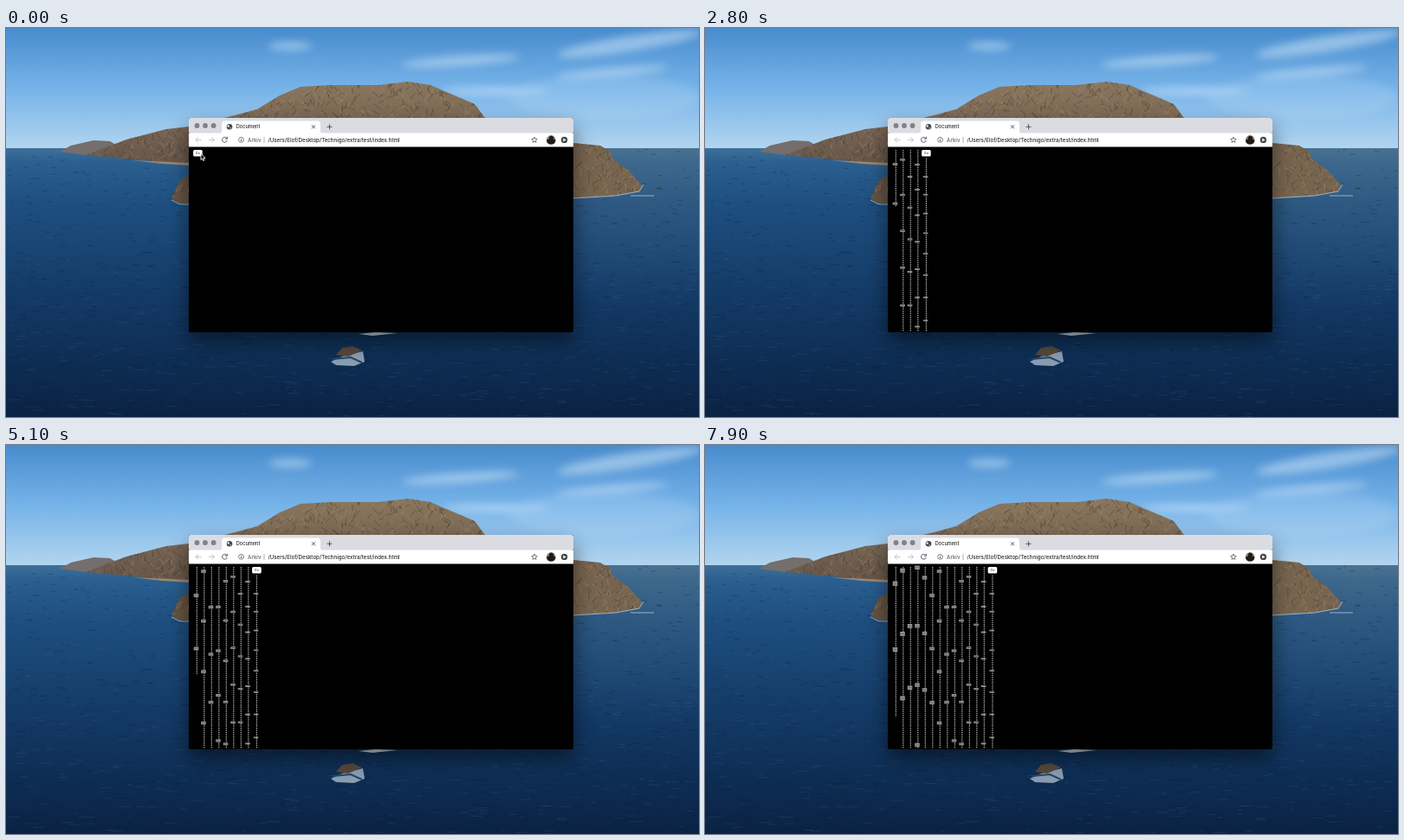
Write an HTML page with a canvas that moves like this. It is 800 by 450 pixels and loops after 8 s.

```html
<!DOCTYPE html>
<html lang="sv">
<head>
<meta charset="utf-8">
<title>Document</title>
<style>
  html, body { margin: 0; width: 100%; height: 100%; overflow: hidden; background: #0b2850; }
  svg, canvas { position: absolute; left: 0; top: 0; width: 800px; height: 450px; }
  text { font-family: Inter, "Open Sans", sans-serif; font-weight: 500; fill: #25272b; }
</style>
</head>
<body>
<svg viewBox="0 0 800 450">
  <defs>
    <linearGradient id="sky" x2="0" y2="1">
      <stop offset="0" stop-color="#488ccd"/>
      <stop offset=".5" stop-color="#76b3e9"/>
      <stop offset="1" stop-color="#b2d5ef"/>
    </linearGradient>
    <linearGradient id="sea" x2="0" y2="1">
      <stop offset="0" stop-color="#3f709a"/>
      <stop offset=".05" stop-color="#2b6090"/>
      <stop offset=".2" stop-color="#1e4f80"/>
      <stop offset=".55" stop-color="#133a66"/>
      <stop offset="1" stop-color="#0a2244"/>
    </linearGradient>
    <linearGradient id="land" x2="0" y2="1">
      <stop offset="0" stop-color="#8b775e"/>
      <stop offset="1" stop-color="#66564a"/>
    </linearGradient>
    <radialGradient id="glow" cx=".95" cy="0" r=".6">
      <stop offset="0" stop-color="#587488" stop-opacity=".5"/>
      <stop offset="1" stop-color="#3f607c" stop-opacity="0"/>
    </radialGradient>
    <filter id="soft" x="-30%" y="-80%" width="160%" height="260%"><feGaussianBlur stdDeviation="5"/></filter>
    <filter id="shade" x="-20%" y="-20%" width="140%" height="150%"><feGaussianBlur stdDeviation="12"/></filter>
    <clipPath id="ground"><use href="#hill"/><use href="#rock"/><use href="#cape"/></clipPath>
  </defs>

  <rect width="800" height="140" fill="url(#sky)"/>
  <g fill="#d5e9fa" filter="url(#soft)" opacity=".5">
    <ellipse cx="328" cy="21" rx="25" ry="5"/>
    <ellipse cx="525" cy="38" rx="68" ry="6" transform="rotate(-4 525 38)"/>
    <ellipse cx="720" cy="18" rx="85" ry="9" transform="rotate(-9 720 18)"/>
    <ellipse cx="565" cy="73" rx="62" ry="5"/>
    <ellipse cx="700" cy="51" rx="65" ry="5" transform="rotate(-5 700 51)"/>
    <ellipse cx="690" cy="80" rx="110" ry="26" opacity=".35"/>
  </g>
  <rect y="139" width="800" height="311" fill="url(#sea)"/>
  <rect y="139" width="800" height="311" fill="url(#glow)"/>
  <g id="waves" fill="none"/>

  <path d="M62 143L75 136 101 130 120 131 132 138 128 145 92 147z" fill="#746e6c"/>
  <path id="hill" d="M92 147L139 129 185 117 211 114 268 100 290 94 316 78 340 68 376 66 430 66 464 62 490 66 541 88 553 104V158H197L160 153z" fill="url(#land)"/>
  <path id="rock" d="M211 171L201 176 191 197 200 203 211 203z" fill="#665443"/>
  <path id="cape" d="M655 133L686 136 698 143 700 151 718 164 735 183 730 189 704 194 655 197z" fill="#786550"/>
  <g id="crags" fill="none" clip-path="url(#ground)"/>
  <path d="M145 153L211 156V159L180 157z" fill="#9c8872"/>
  <path d="M655 197L704 194 731 189 736 181M191 199L201 204H211M721 194H748" fill="none" stroke="#c8d8e2" opacity=".7"/>
  <path d="M749 186L754 184 758 187z" fill="#39424a"/>
  <path d="M375 386L388 380 412 374 414 386 402 391 381 390z" fill="#a9bac8" opacity=".8"/>
  <path d="M381 378L388 370 400 368 411 373 395 380z" fill="#57493a"/>
  <path d="M377 383L398 381 411 387" fill="none" stroke="#244667" stroke-width="2"/>
  <path d="M407 354L426 352 452 353 423 356z" fill="#c4d2dd"/>

  <rect x="211" y="116" width="444" height="246" fill="#000" opacity=".5" filter="url(#shade)"/>
  <rect x="211" y="104" width="444" height="248" rx="2" fill="#000"/>
  <rect x="211" y="104" width="444" height="18" rx="2" fill="#dadce2"/>
  <rect x="211" y="121.5" width="444" height="16" fill="#fff"/>
  <path d="M246 122Q249 122 249 119V111Q249 107.500 252.500 107.500H359.500Q363 107.500 363 111V119Q363 122 366 122z" fill="#fff"/>
  <g fill="#808289"><circle cx="220.500" cy="113" r="2.900"/><circle cx="230" cy="113" r="2.900"/><circle cx="239.600" cy="113" r="2.900"/></g>
  <circle cx="258" cy="114.300" r="3.300" fill="#45484d"/>
  <path d="M256 112L258 113 257 115 255.500 114zM258.500 115.500L260 115 259 117z" fill="#fff"/>
  <text x="265.800" y="116.300" font-size="5.600">Document</text>
  <g fill="none" stroke="#45484d" stroke-width=".9">
    <path d="M353 112.300l4 4m0 -4l-4 4M370.500 114.300h6m-3 -3v6"/>
    <path d="M225.500 129.300h-6.500m3 -3l-3 3 3 3M234 129.300h6.500m-3 -3l3 3 -3 3" stroke="#b9bbc0"/>
    <path d="M254.700 127.400A2.900 2.900 0 1 0 255.300 130M255.400 125.800v2.400h-2.400"/>
    <circle cx="271.500" cy="129.300" r="2.900" stroke-width=".7"/>
    <path d="M271.500 127.600v.7m0 .7v2"/>
    <path d="M298 126v7" stroke="#8c8f95" stroke-width=".7"/>
    <path d="M610 126l.9 2.300 2.400 .2 -1.800 1.500 .5 2.400 -2 -1.300 -2 1.300 .5 -2.400 -1.800 -1.500 2.400 -.2z" stroke-width=".7"/>
  </g>
  <text x="279" y="131.500" font-size="6.200" style="fill:#606368">Arkiv</text>
  <text x="302.500" y="131.500" font-size="6.150">/Users/Elof/Desktop/Technigo/extra/test/index.html</text>
  <circle cx="629.200" cy="129.400" r="5.300" fill="#8f8270"/>
  <path d="M624 130Q625 128.500 627 128.500A2.700 2.700 0 1 1 632 128.500Q634.500 129 634.500 130A5.300 5.300 0 0 1 624 130z" fill="#1f1b1a"/>
  <circle cx="644.500" cy="129.400" r="3.700" fill="#45484d"/>
  <path d="M643.300 127.400l3.300 2 -3.300 2z" fill="#fff"/>
</svg>
<canvas id="stage" width="800" height="450"></canvas>
<script>
const ctx = document.getElementById('stage').getContext('2d');
const LOOP = 8000, STEP = 100;
const TOP = 141, HEIGHT = 208, LEFT = 220.3, GAP = 8.5, PITCH = HEIGHT / 85;

// [time, columns filled]
const fill = [[600, 0], [1200, 1.14], [2800, 4.31], [4200, 6.97], [5900, 10.04], [7900, 13.83]];
// [time, x, y]
const path = [[700, 225, 145.5], [1200, 351.5, 168.5], [1900, 815, 250]];

let seed = 7;
function rand(min, max) {
  seed = (seed * 16807) % 2147483647;
  return min + (max - min) * seed / 2147483647;
}

// Adds one path of short random strokes; place() returns [x, y, dx, dy].
function scatter(id, count, color, opacity, place) {
  const d = Array.from({ length: count }, () => {
    const [x, y, dx, dy] = place().map(v => v.toFixed(1));
    return `M${x} ${y}l${dx} ${dy}`;
  }).join('');
  document.getElementById(id).insertAdjacentHTML('beforeend',
    `<path d="${d}" stroke="${color}" opacity="${opacity}"/>`);
}

function wave() {
  const depth = rand(0, 1);
  return [rand(0, 800), 141 + 309 * depth, rand(3, 6 + 10 * depth), rand(-1, 1)];
}
const crag = () => [rand(90, 740), rand(60, 197), rand(-7, 7), rand(2, 8)];

scatter('waves', 900, '#071e3e', .28, wave);
scatter('waves', 600, '#4c7499', .2, wave);
scatter('crags', 1500, '#42372c', .45, crag);
scatter('crags', 1100, '#ab9272', .4, crag);

function sample(keys, t) {
  const next = keys.findIndex(k => k[0] >= t);
  const i = next < 0 ? keys.length - 1 : Math.max(1, next);
  const a = keys[i - 1], b = keys[i];
  const p = Math.min(1, Math.max(0, (t - a[0]) / (b[0] - a[0])));
  return a.slice(1).map((v, j) => v + (b[j + 1] - v) * p);
}

// Distance of the nth wide row along the folded list; the gaps widen steadily.
const markAt = n => 31 + 20.3 * n + .496 * n * n;

const columnX = (col, last) => col ? LEFT + GAP * (last - col) : 221.4 + GAP * last;

function drawDots(x, from, to) {
  ctx.fillStyle = '#aaa';
  for (let y = from; y < to; y += PITCH) ctx.fillRect(x - .6, y, 1.2, 1.5);
}

function drawMark(x, y, col) {
  const h = 1.7 + col * .28;
  ctx.fillStyle = '#8e8e8e';
  ctx.fillRect(x - 3.6, y - h / 2, 5.6, h);
  if (h < 2.2) return;
  ctx.fillStyle = '#505050';
  ctx.fillRect(x - 2.6, y - .2, 3.6, .5);
}

function drawButton(x) {
  ctx.fillStyle = '#fff';
  ctx.beginPath();
  ctx.roundRect(x - 5.3, 141, 10.6, 7.5, 1.5);
  ctx.fill();
  ctx.fillStyle = '#444';
  ctx.font = '600 3.4px Inter, sans-serif';
  ctx.textAlign = 'center';
  ctx.fillText('Go', x, 146);
}

function drawCursor([x, y]) {
  ctx.save();
  ctx.translate(x, y);
  ctx.beginPath();
  for (const [px, py] of [[0, 0], [0, 7], [1.6, 5.6], [2.7, 8], [3.9, 7.4], [2.8, 5.1], [5, 5]]) ctx.lineTo(px, py);
  ctx.closePath();
  ctx.fillStyle = '#000';
  ctx.strokeStyle = '#fff';
  ctx.lineWidth = .9;
  ctx.fill();
  ctx.stroke();
  ctx.restore();
}

function draw(t) {
  const [filled] = sample(fill, t);
  const last = Math.floor(filled);
  ctx.clearRect(0, 0, 800, 450);
  for (let c = 0; c <= last; c++) {
    const from = c ? TOP : TOP + 4 * PITCH;
    drawDots(columnX(c, last), from, TOP + HEIGHT * Math.min(1, filled - c));
  }
  for (let n = 0; markAt(n) <= filled * HEIGHT; n++) {
    const col = Math.floor(markAt(n) / HEIGHT);
    drawMark(columnX(col, last), TOP + markAt(n) % HEIGHT, col);
  }
  drawButton(columnX(0, last));
  drawCursor(sample(path, t));
}

function tick() {
  draw(Math.floor(performance.now() % LOOP / STEP) * STEP);
  requestAnimationFrame(tick);
}
tick();
</script>
</body>
</html>
```
